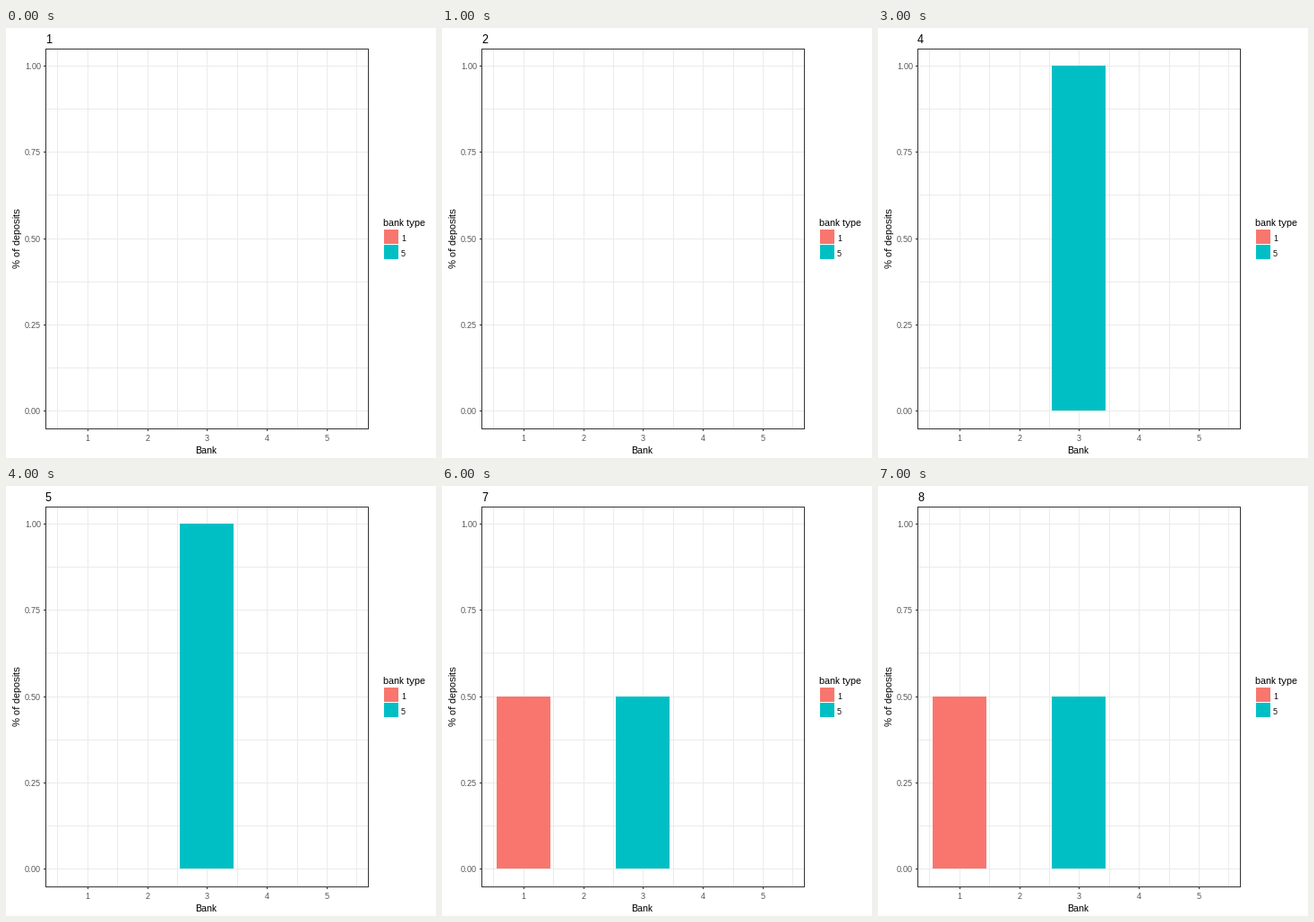
Write a matplotlib script that moves like this. It is 480x480 px and loops after 8000 ms.

```python
import matplotlib.pyplot as plt
from matplotlib.animation import FuncAnimation
from matplotlib.patches import Rectangle

SIZE, DPI = 480, 96
plt.rcParams.update({
    "font.family": "Liberation Sans",
    "text.hinting": "native",
    "text.hinting_factor": 1,
})

RED, TEAL = "#F8766D", "#00BFC4"
GRID, BORDER, TICK_TEXT = "#EBEBEB", "#333333", "#4D4D4D"
LEFT, TOP, RIGHT, BOTTOM = 44, 23, 404, 447
TICK = 2

fig = plt.figure(figsize=(SIZE / DPI, SIZE / DPI), dpi=DPI, facecolor="white")
ax = fig.add_axes([0, 0, 1, 1])
ax.set_xlim(0, SIZE)
ax.set_ylim(SIZE, 0)
ax.axis("off")


def rect(x, y, w, h, color, z=1):
    """Filled box on whole pixels, measured from the top left."""
    patch = Rectangle((x, y), w, h, facecolor=color, linewidth=0,
                      antialiased=False, zorder=z)
    return ax.add_patch(patch)


def label(x, y, text, px=11, color="black", ha="left", va="baseline", **kw):
    return ax.text(x, y, text, fontsize=px * 72 / DPI, color=color,
                   ha=ha, va=va, **kw)


def x_px(bank):
    return round(LEFT + (bank - 0.3) * 66.8)


def y_px(share):
    return int(427.8 - share * 385.4)


# Grid: major and minor lines look the same
for i in range(11):
    rect(x_px(0.5 + i / 2), TOP, 1, BOTTOM - TOP, GRID)
for i in range(9):
    rect(LEFT, y_px(i / 8), RIGHT - LEFT, 1, GRID)

# Panel border
for y in (TOP, BOTTOM):
    rect(LEFT, y, RIGHT - LEFT + 1, 1, BORDER, 4)
for x in (LEFT, RIGHT):
    rect(x, TOP, 1, BOTTOM - TOP + 1, BORDER, 4)

# Ticks and their labels
for bank in range(1, 6):
    x = x_px(bank)
    rect(x, BOTTOM + 1, 1, TICK, BORDER)
    label(x, 461, str(bank), 9, TICK_TEXT, "center")
for i in range(5):
    y = y_px(i / 4)
    rect(LEFT - TICK, y, TICK, 1, BORDER)
    label(39, y + 4, f"{i / 4:.2f}", 9, TICK_TEXT, "right")

# Axis titles
label(223.5, 475, "Bank", ha="center")
label(13.5, 235, "% of deposits", ha="center", va="center", rotation=90)

# Legend
label(421, 221, "bank type")
for y, color, name in ((225, RED, "1"), (242, TEAL, "5")):
    rect(422, y, 16, 16, color)
    label(441, y + 13, name, 9)

title = label(44, 17, "1", 13)
bars = {bank: rect(x_px(bank) - 30, y_px(0), 60, 0, color, 3)
        for bank, color in ((1, RED), (3, TEAL))}


def shares(step):
    if step < 4:
        return {1: 0, 3: 0}
    if step < 7:
        return {1: 0, 3: 1}
    return {1: 0.5, 3: 0.5}


def draw(frame):
    step = frame + 1
    title.set_text(str(step))
    for bank, share in shares(step).items():
        top = y_px(share)
        bars[bank].set_y(top)
        bars[bank].set_height(y_px(0) - top)
        bars[bank].set_visible(share > 0)
    return [title, *bars.values()]


anim = FuncAnimation(fig, draw, frames=8, interval=1000, repeat=True,
                     repeat_delay=0, blit=False)
plt.show()
```
